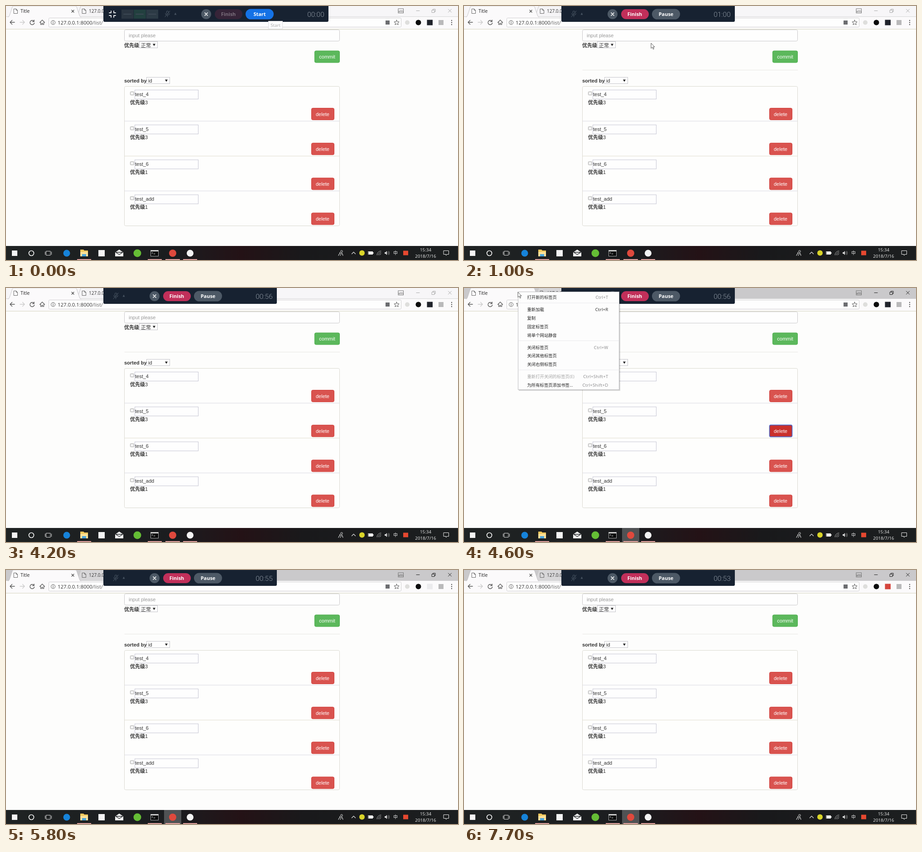
These frames come from a looping animation (998 px wide and 561 px high, 8000 ms). An HTML page:

```html
<!DOCTYPE html>
<html lang="zh">
<head>
<meta charset="utf-8">
<title>Task list</title>
<style>
html, body { margin: 0; width: 100%; height: 100%; overflow: hidden; background: #fdfdfc; }
svg { display: block; width: 100vw; height: 100vh; }
text { font: 11px "Liberation Sans", "Noto Sans CJK SC", "Noto Sans CJK", sans-serif; fill: #333; white-space: pre; }
.ui { font-family: "Open Sans", "Noto Sans CJK SC", "Noto Sans CJK", sans-serif; }
.b { font-weight: 700; }
.mid { text-anchor: middle; }
.end { text-anchor: end; }
.line { fill: none; stroke-linecap: round; stroke-linejoin: round; }
</style>
</head>
<body>
<svg id="stage" viewBox="0 0 998 561" preserveAspectRatio="none"></svg>
<script>
const LOOP = 8000;
const stage = document.getElementById('stage');

const rect = (x, y, w, h, fill, extra = '') =>
  `<rect x="${x}" y="${y}" width="${w}" height="${h}" fill="${fill}" ${extra}/>`;
const box = (x, y, w, h, stroke, r = 0, fill = '#fefefe') =>
  rect(x + .5, y + .5, w - 1, h - 1, fill, `stroke="${stroke}" rx="${r}"`);
const disc = (x, y, r, fill, extra = '') =>
  `<circle cx="${x}" cy="${y}" r="${r}" fill="${fill}" ${extra}/>`;
const line = (d, stroke, w = 1, extra = '') =>
  `<path class="line" d="${d}" stroke="${stroke}" stroke-width="${w}" ${extra}/>`;
const text = (x, y, s, cls = '', size = 11, fill = '#333', extra = '') =>
  `<text x="${x}" y="${y}" class="${cls}" style="font-size:${size}px;fill:${fill}" ${extra}>${s}</text>`;
const group = (id, body, extra = '') => `<g id="${id}" ${extra}>${body}</g>`;
const caret = (x, y) => `<path d="M${x - 3} ${y - 2.5}h6l-3 5z" fill="#222"/>`;

function pageIcon(x) {
  return line(`M${x + .5} 6.5h5l3 3v7h-8zM${x + 5.5} 6.5v3h3`, '#666');
}

function browser() {
  const tool = '#555';
  return rect(0, 0, 998, 24, '#f7f6f8', 'id="strip"') +
    '<path id="tab2" d="M157 24L165 0H320V24z" fill="#f5f4f6" stroke="#c4c3c5" stroke-width=".8"/>' +
    pageIcon(168) + text(183, 15, '127.0.0.1:8000', 'ui', 10) +
    rect(0, 24, 998, 27, '#fbfafb') +
    line('M0 23.5H5M166 23.5H998', '#cfced0', .8) +
    '<path d="M4 24.5Q7 24 8 20L14 2Q15 0 17 0H153Q155 0 156 2L162 20Q163 24 166 24.5" fill="#fbfafb" stroke="#bdbcbe" stroke-width=".8"/>' +
    pageIcon(17) + text(32, 15, 'Title', 'ui', 10.3, '#222') +
    line('M145 9l5 5M150 9l-5 5', '#444', 1.2) +
    line('M0 51H998', '#e2e1d2') +
    line('M19 36H9M13.5 31.5L9 36l4.5 4.5', tool, 1.4) +
    line('M31 36h10M36.500 31.5L41 36l-4.500 4.500', '#ccc', 1.4) +
    line('M61.500 33.500A4.800 4.800 0 1 0 62.500 37.500M62 31v3.500h-3.500', tool, 1.4) +
    line('M74.500 36.500L80 31l5.500 5.500M76.500 36v5h2.500v-3h2v3h2.500v-5', tool, 1.2) +
    box(94, 26, 779, 21, '#cfced0', 2) +
    disc(104, 36.500, 4.500, 'none', 'stroke="#555"') + rect(103.400, 35.700, 1.200, 3.300, '#555') + rect(103.400, 33.800, 1.200, 1.200, '#555') +
    text(114, 40.500, '127.0.0.1:8000<tspan fill="#666">/list/</tspan>', 'ui', 11.3) +
    rect(838, 32, 9, 9, '#6c6d70') +
    line('M862.500 31l1.600 3.700 4 .3-3 2.600 1 3.900-3.600-2.100-3.600 2.100 1-3.900-3-2.600 4-.3z', '#555') +
    disc(886, 36.500, 5, '#dededc') + disc(910.500, 36.500, 6, '#0b0b0c') +
    rect(929.500, 30.500, 12.500, 12, '#20232b', 'id="ext"') +
    rect(955, 31, 11, 11, '#b9b9ba') +
    [32, 36.500, 41].map(y => disc(984, y, 1.200, '#555')).join('') +
    rect(866, 6, 11.500, 9.500, 'none', 'stroke="#777"') +
    text(871.700, 14, 'vm', 'ui mid', 7.500, '#444') +
    group('controls', line('M906 10.500h7M940.500 9h5.500v5.500h-5.500zM942.500 9V7h5.500v5.500h-2M976.500 7l7 7M983.500 7l-7 7', 'currentColor'));
}

function row(name, level, i) {
  const y = 177 + i * 77.15;
  return box(274, y + 12, 9, 8, '#a5a5a5', 1, '#f3f3f3') +
    box(284, y + 8, 141, 21, '#c5c5d3') +
    text(285, y + 22, name) +
    text(274, y + 40, `<tspan class="b">优先级</tspan>${level}`) +
    rect(674.500, y + 48.500, 50, 26, '#d9534f', `rx="3" stroke="#d03f3a" class="del"`) +
    text(699, y + 65.500, 'delete', 'mid', 11, '#fff');
}

function page() {
  const rows = [['test_4', 3], ['test_5', 3], ['test_6', 1], ['test_add', 1]];
  return rect(0, 51, 998, 480, '#fdfdfc') + line('M0 51.500H998', '#e2e1d2') +
    box(261, 52, 476, 26, '#c9c8ca', 3) +
    text(271, 69, 'input please', '', 11, '#999') +
    text(261, 91, '优先级', 'b') +
    box(294, 78, 41, 15, '#c4c4ca') + text(298, 91, '正常') + caret(327, 86) +
    rect(681.500, 99, 55, 26, '#5cb85c', 'rx="3" stroke="#4cae4c"') +
    text(709, 116, 'commit', 'mid', 11, '#fff') +
    line('M262 141.500H737', '#e7e6e4', 1, 'id="rule"') +
    text(261, 169, 'sorted by', 'b') +
    box(310, 157, 52, 15, '#c4c4ca') + text(314, 169, 'id') + caret(354, 165) +
    box(261, 177, 476, 309, '#dad9d0', 3, '#fefefd') +
    [254.2, 331.4, 408.5].map((y, i) => line(`M262 ${y}H736`, i === 1 ? '#dfddce' : '#d9d9e3')).join('') +
    rows.map(([name, level], i) => row(name, level, i)).join('');
}

function taskbar() {
  const w = '#f4f4f4';
  return rect(0, 530, 998, 31, 'url(#dark)') +
    rect(349, 530, 38, 31, '#505254', 'id="active"') +
    [[157, 31], [313, 31], [352, 32], [391, 31]].map(([x, n]) => rect(x, 559, n, 2, '#e5a3a0')).join('') +
    rect(13, 540, 12, 12, w) +
    disc(56, 546, 5.500, 'none', 'stroke="#f4f4f4" stroke-width="1.700"') +
    line('M89 541.500h9v9h-9zM86.500 543v6M100.500 543v6', '#ddd') +
    disc(134, 546, 7.500, '#1683da') +
    '<path d="M164 538h7l2 2h8v13h-17z" fill="#f4c95d"/>' + rect(164, 543, 17, 10, '#fbe199') + rect(168, 548, 9, 5, '#4ca6dc') +
    rect(204, 539, 14, 14, w) +
    '<path d="M241 544l9-6 9 6v9h-18z" fill="#f4f4f4"/>' + line('M242 544h16l-8 5z', '#26282b', 1.300) +
    disc(290, 546, 8.500, '#65bd35') +
    box(319, 539, 18, 14, '#aaa', 0, '#08090a') + rect(320, 540, 16, 2, '#ddd') + line('M322 544l2 1.500-2 1.500M326 547.500h3', '#ddd') +
    disc(368, 546, 8, '#df493d') + disc(406.500, 546, 7.500, w) +
    disc(741, 542, 2.200, 'none', 'stroke="#ddd"') + line('M734 551l3-5h5l2 5M737 546v-2M738 551l2-3', '#ddd', 1.200) +
    line('M763.500 547.500l4-4 4 4', '#ddd', 1.200) +
    disc(786, 545.500, 6, '#d9d429') +
    rect(799, 542, 11, 7, '#eee') + rect(810, 544, 1.500, 3, '#eee') + line('M800 543v6', '#333') +
    line('M819 550a9 9 0 0 1 9-9M822 550a6 6 0 0 1 6-6M825 550a3 3 0 0 1 3-3', '#aaa') +
    '<path d="M836 544h2l3-3v9l-3-3h-2z" fill="#ddd"/>' + line('M843 543q2 2.500 0 5M845 541.500q3 4 0 8', '#aaa', .9) +
    text(860, 549, '中', 'ui mid', 10, '#eee') +
    rect(877, 540.500, 11, 10, '#e54830') +
    text(926.500, 542, '15:34', 'ui mid', 9.800, '#eee') +
    text(926.500, 556, '2018/7/16', 'ui mid', 9.800, '#eee') +
    line('M966.500 540.500h11v8h-4l-2 2.500v-2.500h-5z', '#eee');
}

// Positions are those of the wide bar; the content slides left when recording starts.
function recorder() {
  return `<rect id="panel" x="215" y="-5" height="40" rx="3" fill="#172231"/>` +
    `<g clip-path="url(#barClip)"><g id="slide">` +
    group('setup',
      line('M228 15h4v-4M242 15h-4v-4M228 21h4v4M242 21h-4v4', '#e5e8eb', 1.800) +
      ['#2a3541', '#22403f', '#2c3a45'].map((c, i) => rect(255 + i * 27.300, 8, 26.500, 20, c)).join('') +
      [260, 287, 315].map(x => line(`M${x} 18h16`, '#3c4854', 2)).join('')) +
    line('M354.500 12q2-2 4 0v4q-2 3-4 0zM352 16q0 4 4.500 4t4.500-4M356.500 20v4M351 24l11-13', '#465260', 1.100) +
    '<path d="M371.500 19.500l2.500-5 2.500 5z" fill="#465260"/>' +
    disc(442, 18, 11, '#4d5966') + line('M439 15l6 6M445 15l-6 6', '#fff', 1.700) +
    rect(461, 7, 61, 22, '#c12f5a', 'rx="11" id="finish"') +
    text(491, 22, 'Finish', 'ui b mid', 11, '#fff', 'id="finishText"') +
    rect(529, 6.500, 62, 23, '#1472e6', 'rx="11.500" id="main"') +
    text(560, 22, 'Start', 'ui b mid', 11, '#fff', 'id="mainText"') +
    text(684, 24, '00:00', 'mid', 16, '#8b949f', 'id="clock" font-family="Roboto"') +
    `</g></g>` +
    group('tip', box(579, 33, 32, 18, '#dfdfe2', 0, '#fcfcfd') + text(595, 46, 'Start', 'ui mid', 9.800, '#aaa'));
}

function menu() {
  const items = [
    [20, '打开新的标签页', 'Ctrl+T'], [47.5, '重新加载', 'Ctrl+R'], [66, '复制', ''],
    [85, '固定标签页', ''], [104, '将单个网站静音', ''], [131, '关闭标签页', 'Ctrl+W'],
    [149.5, '关闭其他标签页', ''], [168, '关闭右侧标签页', ''],
    [195.5, '重新打开关闭的标签页(E)', 'Ctrl+Shift+T'], [214.5, '为所有标签页添加书签...', 'Ctrl+Shift+D']
  ];
  return rect(121, 10, 224, 217, '#000', 'opacity=".16"') +
    box(119, 8, 224, 217, '#bdbdbf', 0, '#fdfdfd') +
    rect(120, 38, 222, 18, '#ededee', 'id="hover"') +
    [33, 116.5, 181].map(y => line(`M120 ${y}H342`, '#e9e9ec')).join('') +
    items.map(([y, label, key], i) =>
      text(139.500, y + 3.500, label, 'ui', 9.350, i === 8 ? '#a5a5a5' : '#222') +
      text(318.500, y + 3.500, key, 'ui end', 9.600, i === 1 ? '#222' : '#858587', 'letter-spacing=".25"')).join('');
}

stage.innerHTML =
  `<defs><linearGradient id="dark"><stop offset="0" stop-color="#1f2323"/><stop offset=".38" stop-color="#1b1c1f"/>` +
  `<stop offset=".52" stop-color="#241216"/><stop offset=".66" stop-color="#19191b"/><stop offset="1" stop-color="#1c1f20"/></linearGradient>` +
  `<clipPath id="barClip"><rect id="clipRect" x="215" y="0" height="35"/></clipPath></defs>` +
  browser() + page() + taskbar() + recorder() + group('menu', menu()) +
  '<path id="cursor" d="M0 0V11.500L2.700 9l2 4.500 1.800-.8-2-4.300H8z" fill="#fff" stroke="#444" stroke-width=".9"/>';

const el = {};
stage.querySelectorAll('[id]').forEach(n => el[n.id] = n);
el.clock.style.fontFamily = 'Roboto, sans-serif';
el.clock.style.fontWeight = 300;
el.clock.style.fontSize = '15.5px';
const focusable = stage.querySelectorAll('.del')[1];

const set = (node, attrs) => { for (const k in attrs) node.setAttribute(k, attrs[k]); };
const show = (node, on) => node.setAttribute('visibility', on ? 'visible' : 'hidden');
const between = (t, a, b) => t >= a && t < b;
const ease = (t, a, b) => {
  const p = Math.min(1, Math.max(0, (t - a) / (b - a)));
  return p * p * (3 - 2 * p);
};

// start, end, from x, y, to x, y
const moves = [
  [500, 1000, 550, 18, 413, 82], [1000, 1500, 413, 82, 400, 80],
  [3300, 4200, 300, 60, 119, 9], [4300, 4700, 119, 9, 119, 9],
  [4700, 5100, 119, 9, 142, 41], [5100, 5500, 142, 41, 142, 41],
  [6600, 6900, 190, 30, 127, 9], [6900, 7300, 127, 9, 150, 42],
  [7300, 7600, 150, 42, 150, 42]
];
const ticks = [1300, 2300, 3300, 4200, 5300, 6300, 7300];

function clock(t) {
  if (t < 800) return '00:00';
  const left = 60 - ticks.filter(k => t >= k).length;
  return left === 60 ? '01:00' : '00:' + left;
}

function draw(t) {
  const p = ease(t, 200, 800), width = 497 - 114 * p;
  set(el.panel, { width });
  set(el.clipRect, { width });
  set(el.slide, { transform: `translate(${-114 * p})` });
  set(el.setup, { opacity: 1 - p });
  set(el.finish, { opacity: .18 + .82 * p });
  set(el.finishText, { opacity: .35 + .65 * p });
  const started = t >= 300;
  set(el.main, { fill: started ? '#4d5966' : '#1472e6' });
  el.mainText.textContent = started ? 'Pause' : 'Start';
  el.clock.textContent = clock(t);
  show(el.tip, t < 300);
  show(el.rule, t >= 100);

  const focused = t >= 4300;
  set(el.strip, { fill: focused ? '#cac9cb' : '#f7f6f8' });
  set(el.tab2, { fill: focused ? '#d7d6d8' : '#f5f4f6' });
  set(el.controls, { color: focused ? '#222' : '#aaa' });
  show(el.active, focused);
  const pressed = between(t, 4300, 5700);
  set(focusable, pressed
    ? { fill: '#c9302c', stroke: '#4a68c9', 'stroke-width': 1.6 }
    : { fill: '#d9534f', stroke: '#d03f3a', 'stroke-width': 1 });

  const loading = between(t, 5500, 6600) || between(t, 7500, 7700);
  set(el.ext, { fill: loading ? '#ebebed' : t >= 6600 ? '#d5453d' : '#20232b' });

  const second = t >= 6000;
  show(el.menu, between(t, 4600, 5400) || between(t, 6900, 7500));
  set(el.menu, { transform: `translate(${second ? 8 : 0})` });
  show(el.hover, between(t, 5000, 5400) || between(t, 7200, 7500));

  const m = moves.find(k => between(t, k[0], k[1]));
  show(el.cursor, !!m);
  if (m) {
    const q = ease(t, m[0], m[1]);
    set(el.cursor, { transform: `translate(${m[2] + (m[4] - m[2]) * q} ${m[3] + (m[5] - m[3]) * q})` });
  }
}

const begin = performance.now();
function tick() {
  const t = (performance.now() - begin) % LOOP;
  draw(Math.floor(t / 100) * 100);
  requestAnimationFrame(tick);
}
draw(0);
requestAnimationFrame(tick);
</script>
</body>
</html>
```
